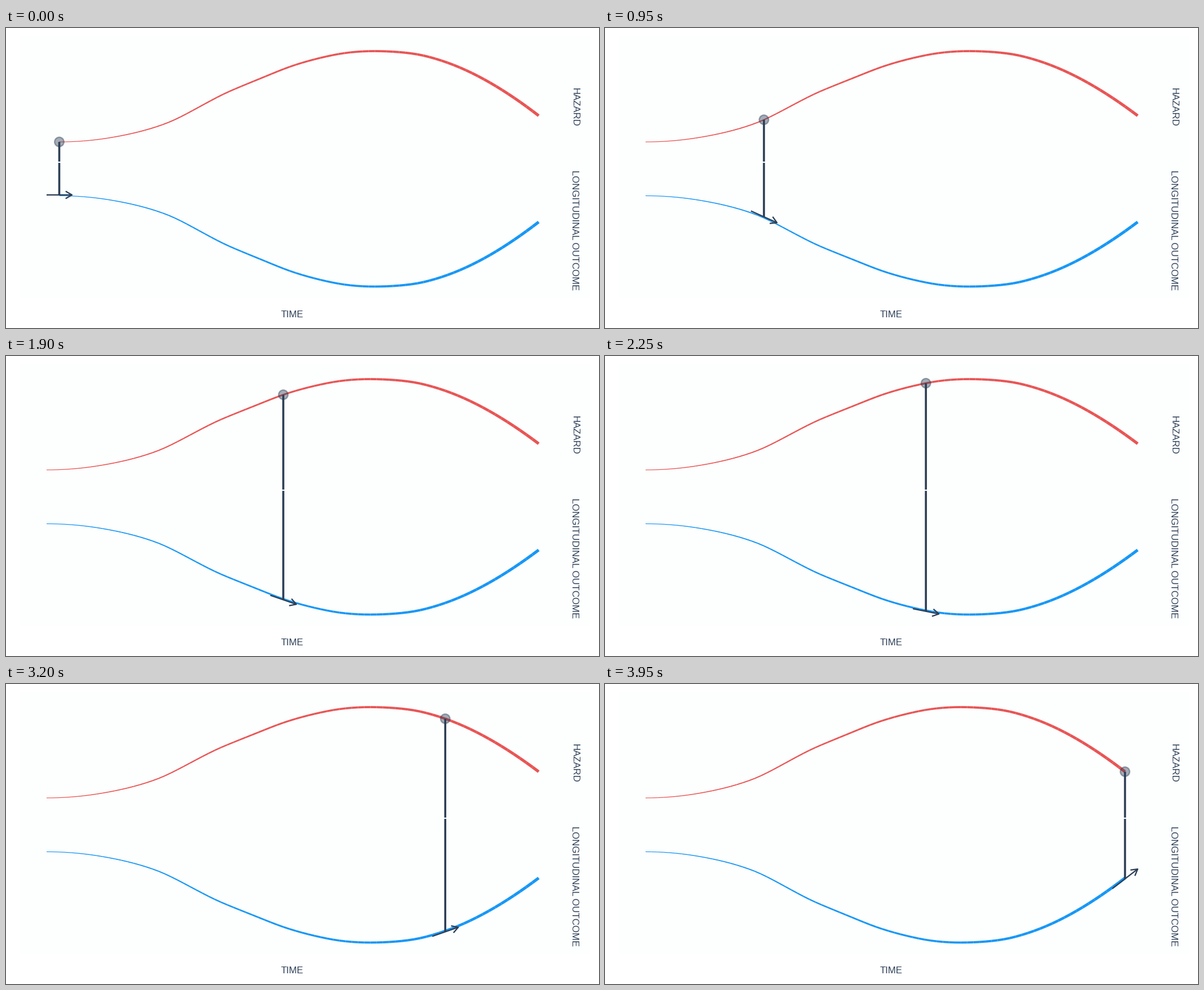
A matplotlib script that plays this animation: 1052 by 532 pixels, repeating every 4000 ms.

```python
import numpy as np
import matplotlib.pyplot as plt
from matplotlib.animation import FuncAnimation
from matplotlib.collections import LineCollection
from matplotlib.patches import Circle, Rectangle

W, H, DPI = 1052, 532, 100
FRAMES = 80
LEFT, RIGHT = 72, 945
SPAN = RIGHT - LEFT
REACH = 23.1            # half of the tangent arrow, along x
RED_BASE, BLUE_BASE = 202, 297.5
GAP = (236.9, 239.1)    # space between the two panels
RED, BLUE, DARK = "#e95454", "#1697f6", "#2c3e55"

# x, rise above the base line, slope
KNOTS = np.array([
    (72, 0, 0), (168, 8, .167), (264, 32, .36), (282, 39.3, .45),
    (330, 63.7, .53), (380, 88.8, .44), (403.5, 98.6, .405),
    (437, 112, .395), (500, 136, .32), (569.5, 153.8, .2),
    (645, 161, 0), (691, 159.2, -.08), (740, 152, -.24),
    (779.5, 140.3, -.35), (945, 46.5, -.75),
])


def rise(x):
    """Cubic Hermite curve through the knots: height and slope."""
    kx, ky, km = KNOTS.T
    i = np.clip(np.searchsorted(kx, x, side="right") - 1, 0, len(kx) - 2)
    w = kx[i + 1] - kx[i]
    t = (x - kx[i]) / w
    a, b = ky[i], ky[i + 1]
    p, q = km[i] * w, km[i + 1] * w
    y = (a * (2*t**3 - 3*t**2 + 1) + p * (t**3 - 2*t**2 + t)
         + b * (3*t**2 - 2*t**3) + q * (t**3 - t**2))
    dy = (6 * (a - b) * (t**2 - t) + p * (3*t**2 - 4*t + 1)
          + q * (3*t**2 - 2*t)) / w
    return y, dy


def pt(px):
    return px * 72 / DPI


fig = plt.figure(figsize=(W / DPI, H / DPI), dpi=DPI, facecolor="white")
ax = fig.add_axes([0, 0, 1, 1])
ax.set_xlim(0, W)
ax.set_ylim(H, 0)
ax.axis("off")
ax.add_patch(Rectangle((24, 15), 1012, 464, color="#fdfefe", lw=0, zorder=0))


def label(x, y, text, angle=0):
    ax.text(x, y, text, color=DARK, family="Liberation Sans", size=pt(16.7),
            rotation=angle, rotation_mode="anchor", ha="left", va="baseline")


label(488, 513, "TIME")
label(1004.3, 105.5, "HAZARD", 270)
label(1004.3, 251.5, "LONGITUDINAL OUTCOME", 270)

xs = np.linspace(LEFT, RIGHT, FRAMES)
hs, slopes = rise(xs)
widths = pt(np.linspace(1.1, 5.2, FRAMES - 1))


def ribbon(color):
    return ax.add_collection(LineCollection(
        [], colors=color, linewidths=widths, capstyle="butt", zorder=2))


def stroke(px, zorder):
    line, = ax.plot([], [], color=DARK, lw=pt(px), zorder=zorder, snap=False,
                    solid_capstyle="butt", solid_joinstyle="round")
    return line


red, blue = ribbon(RED), ribbon(BLUE)
red_bar, blue_bar = stroke(3.6, 3), stroke(3.6, 3)
shaft, head = stroke(2.3, 4), stroke(2.3, 4)
disc = ax.add_patch(Circle((0, 0), 8.3, fc=DARK, lw=0, alpha=.42, zorder=5))
ring = ax.add_patch(Circle((0, 0), 8.3, fill=False, ec=DARK, lw=pt(2.4),
                           alpha=.42, zorder=6))


def segments(x, y):
    p = np.column_stack([x, y])
    return np.stack([p[:-1], p[1:]], axis=1)


def draw(k):
    # the x scale widens whenever the arrow pokes past the data
    lo = min(LEFT, xs[k] - REACH)
    hi = max(RIGHT, xs[k] + REACH)
    scale = SPAN / (hi - lo)
    px = LEFT + (xs - lo) * scale

    red.set_segments(segments(px, RED_BASE - hs))
    blue.set_segments(segments(px, BLUE_BASE + hs))

    x = px[k]
    top = RED_BASE - hs[k]
    foot = BLUE_BASE + hs[k] + np.interp(k, [0, 22, 28], [-1.5, -2, 1.5])
    red_bar.set_data([x, x], [top, GAP[0]])
    blue_bar.set_data([x, x], [GAP[1], foot])
    disc.center = ring.center = (x, top)

    dx, dy = REACH * scale, REACH * slopes[k]
    tip = x + dx, foot + dy
    shaft.set_data([x - dx, tip[0]], [foot - dy, tip[1]])
    turn = np.arctan2(dy, dx) + np.pi + np.array([-1, 1]) * np.pi / 6
    wx, wy = tip[0] + 13 * np.cos(turn), tip[1] + 13 * np.sin(turn)
    head.set_data([wx[0], tip[0], wx[1]], [wy[0], tip[1], wy[1]])
    return red, blue, red_bar, blue_bar, shaft, head, disc, ring


anim = FuncAnimation(fig, draw, frames=FRAMES, init_func=lambda: draw(0),
                     interval=50, repeat=True, repeat_delay=0, blit=False)
plt.show()
```
